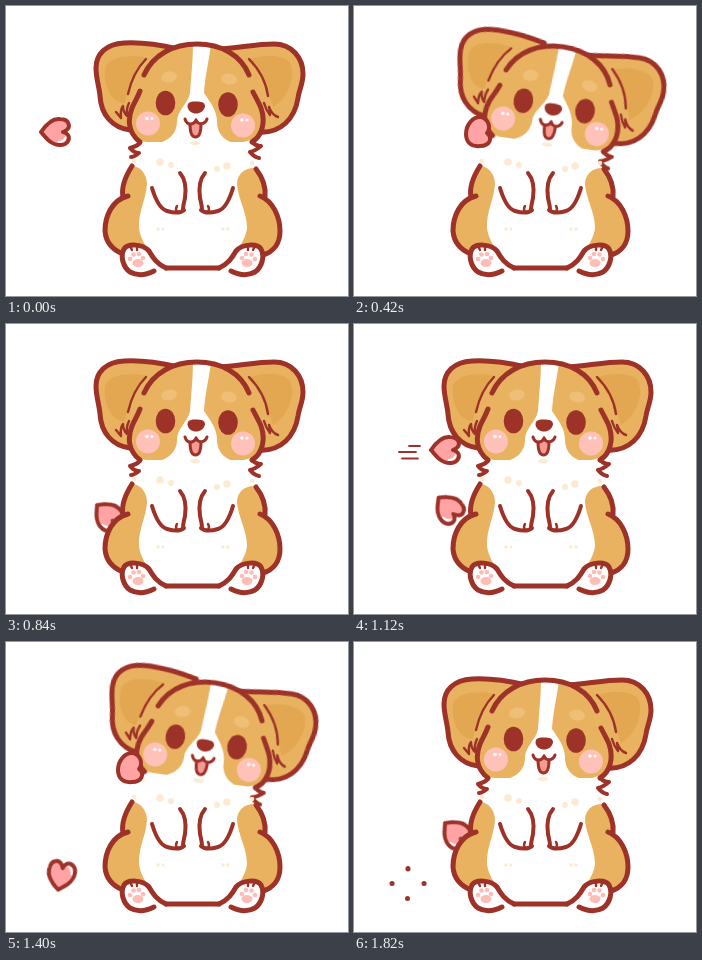
Recreate the animation shown at these times as an HTML page without scripts. Size 342 px wide and 290 px high, loop 1960 ms.

```html
<!DOCTYPE html>
<html lang="en">
<head>
<meta charset="utf-8">
<title>Corgi and hearts</title>
<style>
html, body { margin: 0; width: 100%; height: 100%; overflow: hidden; background: #fff; }
svg { display: block; width: 100%; height: 100%; }
.ink { fill: none; stroke: #9d3229; stroke-width: 5; stroke-linecap: round; stroke-linejoin: round; }
.mid { stroke-width: 4; }
.thin { stroke-width: 3; }
.fine { stroke-width: 2.4; }
.dark { fill: #9d3229; }
.tan { fill: #e9b260; }
.shade { fill: #e3a752; }
.brow { fill: #efbf78; }
.white { fill: #fff; }
.cream { fill: #fcebd2; }
.blush { fill: #ffc1b8; }
.pad { fill: #ffbcb4; }
.pink { fill: #ffa3a5; }
.tongue { fill: #f59b94; }

/* Seven poses of 140 ms each; the fallen heart runs over two rounds. */
.tilt, .earL, .earR, .fly, .hit, .speed, .tuft { animation: .98s step-end infinite; }
.fall, .pop path { animation: 1.96s step-end infinite; }
.tilt { transform-origin: 190px 101px; animation-name: tilt; }
.earL { animation-name: earL; }
.earR { animation-name: earR; }
.fly { animation-name: fly; }
.hit { animation-name: hit; }
.speed { animation-name: speed; }
.tuft { animation-name: tuft; }
.fall { animation-name: fall; }
.pop .burst { animation-name: burst; }
.pop .fade { animation-name: fade; }
.pop .dots { animation-name: dots; }

@keyframes tilt {
  0% { transform: none; }
  28.57% { transform: translate(6px, 2px) rotate(5.5deg); }
  42.85% { transform: translate(9px, 2px) rotate(8.2deg); }
  57.14%, 100% { transform: none; }
}
@keyframes earL {
  0% { transform: none; }
  28.57% { transform: translate(0, -4px); }
  42.85% { transform: translate(0, -6px); }
  57.14% { transform: translate(-5px, -2px); }
  71.42% { transform: translate(1px, -4px); }
  85.71%, 100% { transform: none; }
}
@keyframes earR {
  0% { transform: none; }
  57.14% { transform: translate(-7px, 0); }
  71.42% { transform: translate(0, -2px); }
  85.71%, 100% { transform: none; }
}
@keyframes fly {
  0% { transform: translate(49px, 126px); visibility: visible; }
  14.28% { transform: translate(91px, 126px); visibility: visible; }
  28.57% { transform: translate(115px, 126px); visibility: visible; }
  42.85% { transform: translate(124px, 126px); visibility: hidden; }
  57.14% { transform: translate(100px, 127px); visibility: visible; }
  71.42% { transform: translate(99px, 161px) rotate(22deg); visibility: visible; }
  85.71%, 100% { transform: translate(101px, 191px) rotate(45deg); visibility: visible; }
}
@keyframes hit {
  0% { visibility: hidden; }
  42.85% { visibility: visible; }
  57.14%, 100% { visibility: hidden; }
}
@keyframes speed {
  0% { visibility: hidden; transform: none; }
  14.28% { visibility: visible; transform: none; }
  28.57% { visibility: visible; transform: translate(29px, 0); }
  42.85%, 100% { visibility: hidden; transform: none; }
}
@keyframes tuft {
  0% { opacity: 1; }
  28.57% { opacity: 0; }
  57.14%, 100% { opacity: 1; }
}
@keyframes fall {
  0% { visibility: hidden; transform: translate(100px, 192px) rotate(45deg); }
  50% { visibility: visible; transform: translate(100px, 192px) rotate(45deg); }
  57.14% { visibility: visible; transform: translate(94px, 184px) rotate(48deg); }
  64.28% { visibility: visible; transform: translate(71px, 214px) rotate(-20deg); }
  71.42% { visibility: visible; transform: translate(55px, 234px) rotate(-78deg); }
  78.57%, 100% { visibility: hidden; transform: none; }
}
@keyframes burst { 0% { visibility: hidden; } 78.57% { visibility: visible; } 85.71%, 100% { visibility: hidden; } }
@keyframes fade { 0% { visibility: hidden; } 85.71% { visibility: visible; } 92.85%, 100% { visibility: hidden; } }
@keyframes dots { 0% { visibility: hidden; } 92.85%, 100% { visibility: visible; } }
</style>
</head>
<body>
<svg viewBox="0 0 342 290">
  <defs>
    <g id="heart">
      <path class="pink" d="M-14 0C-10-6-4-14 5-13C14-13 18-4 8 0C18 2 14 14 5 13C-4 13-10 5-14 0Z"/>
      <path d="M3 10Q10 10 11 4.500" fill="none" stroke="#fff" stroke-width="2"/>
      <path class="ink mid" d="M-14 0C-10-6-4-14 5-13C14-13 18-4 8 0C18 2 14 14 5 13C-4 13-10 5-14 0Z"/>
    </g>
    <g id="foot">
      <path class="white" d="M118 248L141 244Q148 258 162 262L140 270 120 262Z"/>
      <path class="ink white" d="M160 262C151 258 147 252 143 245C137 238 122 237 118 243C114 250 117 261 124 266C133 271 142 268 148 265"/>
      <path class="ink fine" d="M124 240l2 4M131 240l0 4"/>
      <ellipse class="pad" cx="132" cy="257" rx="5.500" ry="4"/>
      <circle class="pad" cx="124" cy="253" r="2.300"/>
      <circle class="pad" cx="127.500" cy="248.500" r="2.300"/>
      <circle class="pad" cx="133" cy="248" r="2.300"/>
      <circle class="pad" cx="137" cy="252" r="2.300"/>
    </g>
    <g id="arm">
      <path class="ink mid" d="M146 182C149 192 154 203 161 205C168 207 174 208 178 204M174 167C180 174 180 185 179 192C178 197 177 200 177 203"/>
      <path class="ink fine" d="M171 200Q169 203 171 206"/>
    </g>
  </defs>

  <g class="tilt">
    <g class="earL">
      <path class="ink tan" d="M172 43C155 39 135 36 118 37C100 38 90 48 90 62C90 72 93 80 94 90C95 108 106 122 124 124L150 100Z"/>
      <path class="shade" d="M99 62C104 49 126 49 142 52C130 62 122 80 119 97C106 98 97 80 99 62Z"/>
      <path class="ink fine" d="M140 53Q127 66 122 88M110 106L115 112Q114 104 117 100Q117 106 121 110Q120 103 123 97"/>
    </g>
    <g class="earR">
      <path class="ink tan" d="M212 43C232 42 250 38 268 38C286 38 297 52 297 68C297 78 293 84 292 92C289 112 275 128 252 126L230 100Z"/>
      <path class="shade" d="M241 54C255 49 276 47 284 57C291 72 280 94 267 101C262 84 254 66 241 54Z"/>
      <path class="ink fine" d="M243 53Q259 69 262 90M258 97Q260 104 264 109Q264 104 263 101Q266 109 272 111"/>
    </g>
  </g>

  <g class="fly"><use href="#heart"/></g>
  <path class="ink speed" style="stroke-width:1.800" d="M55 122H66M45 128H62M48 134.500H64"/>

  <path class="white" d="M128 145L126 160Q115 174 117 191C102 194 97 212 99 226C101 240 110 246 117 248L147 262H226L257 250C271 242 275 228 274 220C272 204 266 194 261 192Q261 175 250 163L246 145Z"/>
  <path class="tan" d="M126 160C134 160 141 168 141 178C140 194 132 206 133 222C134 232 140 238 142 248L117 248C102 243 98 232 99 222C100 204 108 194 117 191Q115 176 126 160Z"/>
  <path class="tan" d="M250 162C239 161 231 168 231 178C232 193 241 206 241 222C240 232 234 238 231 248L257 250C270 243 274 232 274 222C272 204 268 196 261 192Q261 177 250 162Z"/>
  <path class="ink" d="M126 160C119 171 115 181 117 191M122 190C106 194 99 210 99 225C100 237 107 244 117 248M250 163C257 172 260 181 259 191M254 190C267 195 274 211 274 225C274 238 267 246 257 249M160 262H213"/>
  <use href="#arm"/>
  <use href="#arm" transform="matrix(-1 0 0 1 373 0)"/>
  <use href="#foot"/>
  <use href="#foot" transform="matrix(-1 0 0 1 373 0)"/>

  <g class="tilt">
    <path class="white" d="M134 130Q130 141 124 142L133 147 140 152H240L248 150 244 145 254 140 247 130Z"/>
    <path class="tan" d="M137 70C145 50 165 38 191 38C216 38 236 50 243 70C250 82 258 100 257 115C255 128 248 134 238 136H140C128 134 123 126 123 116C124 104 129 94 134 84Z"/>
    <path class="white" d="M187 38H205C203 55 199 70 198 87C204 96 211 104 211 116C211 128 219 135 230 138H150C162 135 171 128 171 116C171 104 182 98 184 87C185 70 187 55 187 38Z"/>
    <ellipse class="brow" cx="163" cy="71" rx="8" ry="5.500" transform="rotate(-10 163 71)"/>
    <ellipse class="brow" cx="223" cy="73" rx="8" ry="5.500" transform="rotate(10 223 73)"/>
    <path class="ink" d="M138 69C147 49 167 38 191 38C215 38 235 49 243 69M134 85C131 93 128 97 126 102M126 102C122 112 121 126 134 136M247 86C250 92 253 97 255 102M255 102C260 116 256 130 246 136"/>
    <path class="ink mid tuft" d="M134 137Q130 141 124 142Q128 147 133 147Q128 151 125 151"/>
    <path class="ink mid" d="M246 136Q250 140 255 140Q249 145 244 146Q248 151 253 152"/>
    <ellipse class="cream" cx="189" cy="137" rx="5" ry="2"/>
    <circle class="blush" cx="142" cy="117.500" r="12"/>
    <circle class="blush" cx="237" cy="119.500" r="12"/>
    <g class="white">
      <circle cx="141" cy="112.500" r="1.800"/><circle cx="146" cy="112.500" r="1.500"/>
      <circle cx="236" cy="114" r="1.800"/><circle cx="241" cy="114" r="1.500"/>
    </g>
    <g class="dark">
      <ellipse cx="159.500" cy="97" rx="9.800" ry="12.300"/>
      <ellipse cx="222" cy="98.500" rx="9.800" ry="12.300"/>
      <path d="M181.500 100.500C181.500 95.500 186 95.500 190 95.500C195 95.500 199 96 199 100.500C198 105 194 107.500 190 107.500C186 107.500 182 105 181.500 100.500Z"/>
    </g>
    <path class="ink thin tongue" d="M184 118C184 125 185 131 189.500 131C194 131 195 125 195 118L190 114Z"/>
    <path class="ink thin white" d="M179 113C181 120 188 119 190 114C192 119 199 119 201 113"/>
  </g>

  <g class="cream">
    <circle cx="154" cy="156" r="3.800"/><circle cx="165" cy="159" r="3"/>
    <circle cx="211" cy="163" r="3"/><circle cx="221" cy="160" r="3.800"/>
    <circle cx="128" cy="155" r="2.300"/><circle cx="246" cy="157" r="2.300"/>
    <circle cx="152" cy="223" r="1.800"/><circle cx="157" cy="223" r="1.500"/>
    <circle cx="217" cy="223" r="1.800"/><circle cx="222" cy="223" r="1.800"/>
  </g>

  <path class="ink mid pink hit" d="M112 128C112 119 119 110 127 111C135 113 137 122 133 127C139 132 136 140 126 140C117 141 112 136 112 128Z"/>
  <g class="fall"><use href="#heart"/></g>
  <g class="pop" transform="translate(54 241.500)">
    <path class="ink mid burst" d="M0-8V-15M0 8V15M-9 0H-16M9 0H16"/>
    <path class="ink mid fade" d="M0-11V-15M0 12V16M-12 0H-17M12 0H17"/>
    <path class="ink dots" d="M0-15v.500M-.500 15v.100M-16 0h.100M16 0h.100"/>
  </g>
</svg>
</body>
</html>
```
